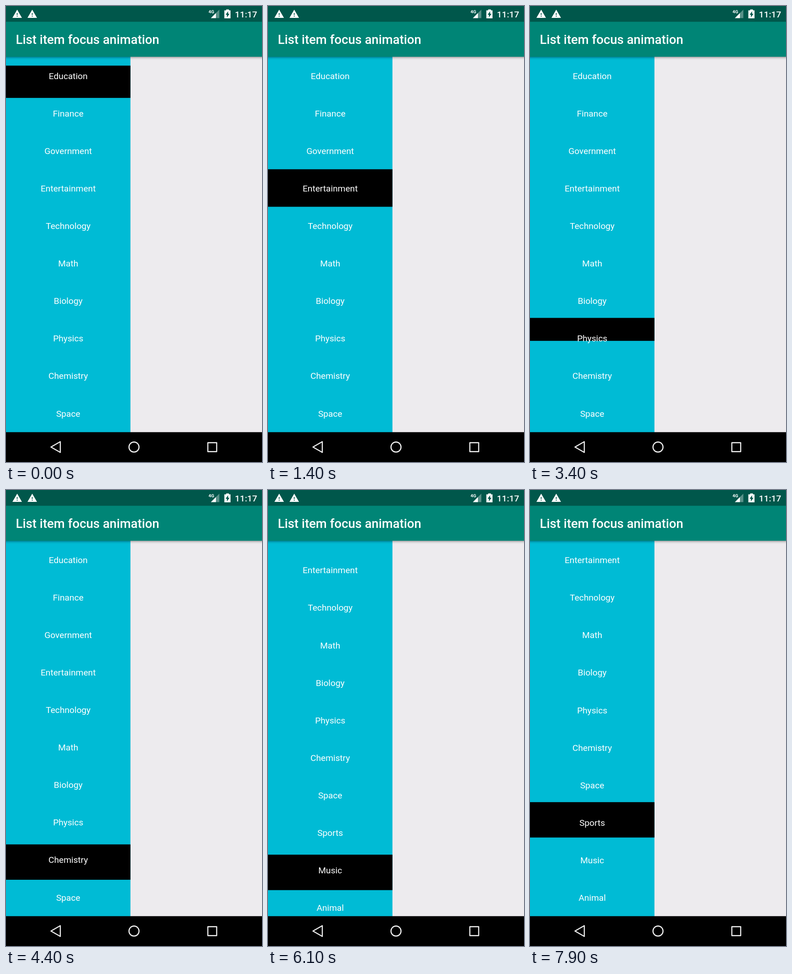
An HTML page that plays this animation: 561x998 px, repeating every 8000 ms.

```html
<!DOCTYPE html>
<html lang="en">
<head>
<meta charset="utf-8">
<title>List item focus animation</title>
<style>
  html, body { margin: 0; width: 100%; height: 100%; overflow: hidden; background: #000; }
  svg { display: block; width: 100vw; height: 100vh; font-family: Roboto, sans-serif; fill: #fff; }
</style>
</head>
<body>
<svg viewBox="0 0 561 998">
  <defs>
    <linearGradient id="shade" x1="0" y1="0" x2="0" y2="1">
      <stop offset="0" stop-opacity=".34"/>
      <stop offset=".45" stop-opacity=".1"/>
      <stop offset="1" stop-opacity="0"/>
    </linearGradient>
    <clipPath id="listArea"><rect y="111" width="273" height="822"/></clipPath>
    <path id="warning" d="M1 21h22L12 2zM13 18h-2v-2h2zM13 14h-2v-4h2z" fill-rule="evenodd"/>
  </defs>

  <rect width="561" height="998" fill="#edebee"/>
  <g clip-path="url(#listArea)">
    <rect y="111" width="272.7" height="822" fill="#00bbd5"/>
    <rect id="band" width="272.7" fill="#000"/>
    <g id="rows" font-size="19.2" text-anchor="middle"></g>
  </g>
  <rect y="111" width="561" height="7" fill="url(#shade)"/>

  <rect y="34" width="561" height="77" fill="#008576"/>
  <text x="21.5" y="83" font-size="27.6" font-weight="500">List item focus animation</text>

  <rect width="561" height="34.5" fill="#00574b"/>
  <use href="#warning" transform="translate(13.1 6.1) scale(.95)"/>
  <use href="#warning" transform="translate(46.1 6.1) scale(.95)"/>
  <path d="M467.5 8V26.5H449z" opacity=".35"/>
  <path d="M460 15.5V26.5H449z"/>
  <text x="443.8" y="16.3" font-size="9.8" font-weight="700">4G</text>
  <path d="M482.5 7.5h6v2h3.5v17.5h-13.5V9.500h4z"/>
  <path d="M486.700 11.500v5.500h3l-5.500 8v-5.800h-3z" fill="#00574b"/>
  <text x="550.3" y="24.7" font-size="19.2" font-weight="500" text-anchor="end">11:17</text>

  <rect y="932.7" width="561" height="66" fill="#000"/>
  <g fill="none" stroke="#eee" stroke-width="2.4" stroke-linejoin="round">
    <path d="M98.500 965.300L119 953.500V977z"/>
    <circle cx="280.500" cy="965.300" r="11"/>
    <rect x="442.300" y="955.800" width="19.400" height="19.400"/>
  </g>
</svg>
<script>
const LOOP = 8000, TICK = 100;
const TOP = 111, ROW = 82.1, VISIBLE = 10;
const ENTER = 400, LEAVE = 250, SCROLL = 330, SCROLL_LEAD = 27;
const labels = ['Education', 'Finance', 'Government', 'Entertainment', 'Technology',
  'Math', 'Biology', 'Physics', 'Chemistry', 'Space', 'Sports', 'Music', 'Animal'];

// Start time of each focus move; the focus walks down to the last row, then back up.
const starts = [-81, 450, 975, 1540, 2086, 2640, 3181, 3850, 4350, 4950, 5480, 6051,
  6950, 7385, 7850];
const last = labels.length - 1;
const rowAfter = n => n <= last ? n : 2 * last - n;

const clamp = x => Math.min(1, Math.max(0, x));
const smooth = x => (1 - Math.cos(Math.PI * clamp(x))) / 2;
const quintOut = x => 1 - (1 - clamp(x)) ** 5;

const band = document.getElementById('band');
const rows = document.getElementById('rows');
labels.forEach((label, i) => {
  const text = document.createElementNS('http://www.w3.org/2000/svg', 'text');
  text.setAttribute('x', 136.3);
  text.setAttribute('y', TOP + i * ROW + 48.6);
  text.textContent = label;
  rows.append(text);
});

const offsetFor = row => row < VISIBLE ? 0 : (row - VISIBLE + 1) * ROW - 0.6;

function scrollAt(t) {
  let offset = 0;
  for (let n = 0; n < last; n++) {
    const distance = offsetFor(n + 1) - offsetFor(n);
    offset += distance * quintOut((t - starts[n] + SCROLL_LEAD) / SCROLL);
  }
  return offset;
}

function draw(t) {
  let n = 0;
  while (n + 1 < starts.length && starts[n + 1] <= t) n++;
  const from = rowAfter(n), to = rowAfter(n + 1), dir = to - from;
  const enter = from + dir * smooth((t - starts[n]) / ENTER);
  const leave = from + dir * smooth((t - starts[n]) / LEAVE);
  const top = dir > 0 ? leave : enter;
  const bottom = (dir > 0 ? enter : leave) + 1;

  const scroll = scrollAt(t);
  band.setAttribute('y', TOP + top * ROW - scroll);
  band.setAttribute('height', (bottom - top) * ROW);
  rows.setAttribute('transform', `translate(0 ${-scroll})`);
}

const begin = performance.now();
function loop() {
  const t = (performance.now() - begin + 6) % LOOP;
  draw(Math.floor(t / TICK) * TICK);
  requestAnimationFrame(loop);
}
loop();
</script>
</body>
</html>
```
